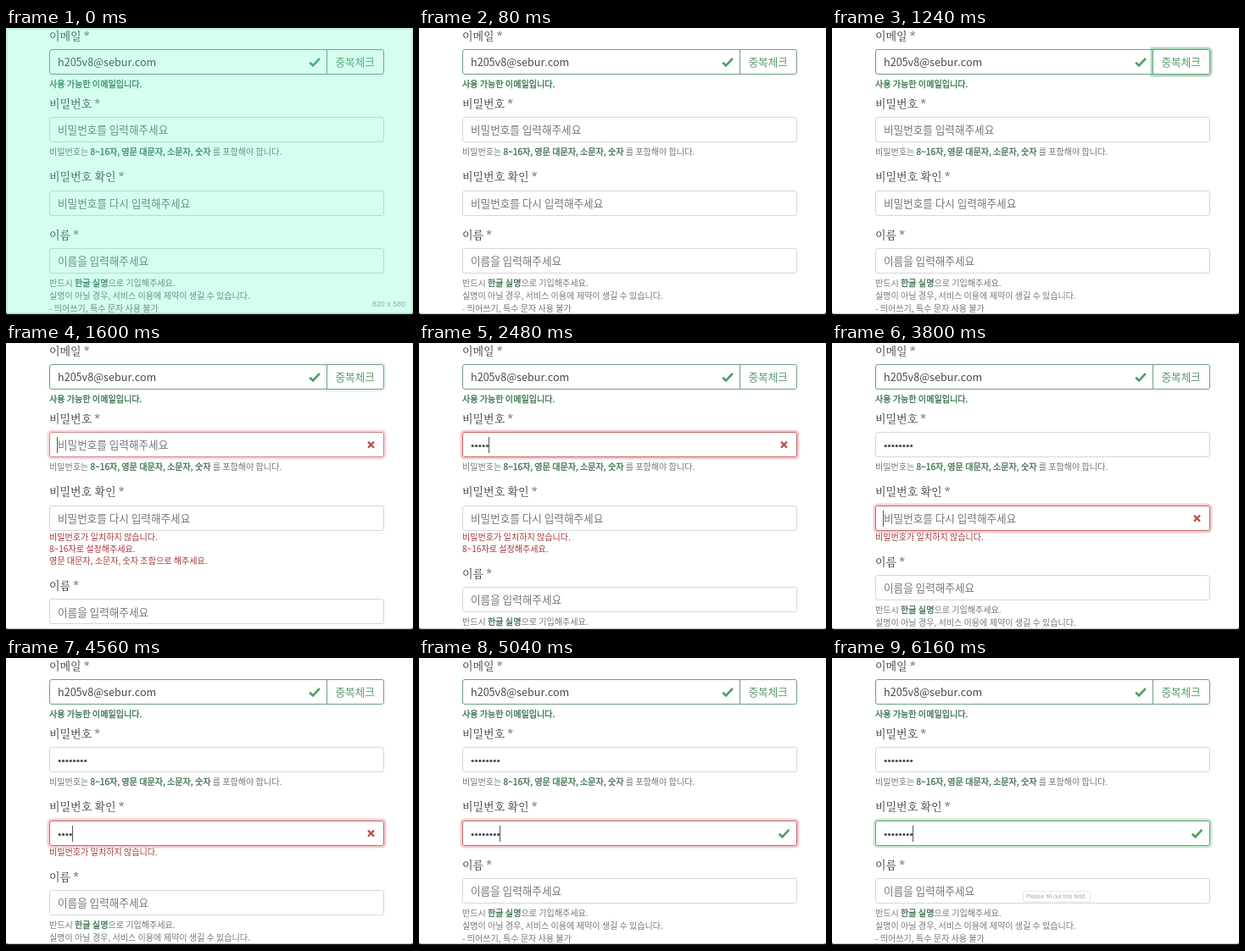
An HTML page with a canvas that plays this animation: 480x339 px, repeating every 6200 ms.

```html
<!DOCTYPE html>
<html lang="ko">
<head>
<meta charset="utf-8">
<title>회원가입 양식</title>
<style>
  html, body { margin: 0; width: 100%; height: 100%; overflow: hidden; background: #fff; }
  canvas { display: block; width: 480px; height: 339px; }
</style>
</head>
<body>
<canvas id="stage" width="480" height="339" lang="ko"></canvas>
<script>
const ctx = document.getElementById('stage').getContext('2d');
const LOOP = 6200, STEP = 40, FADE = 150;
const SANS = '"Noto Sans CJK KR", "Noto Sans KR", "Noto Sans CJK", sans-serif';
const SERIF = '"Noto Serif CJK KR", "Noto Serif KR", "Noto Sans CJK KR", serif';
const LATIN = '"Liberation Sans", Arial, sans-serif';

const INK = '#333', VALUE = '#46494c', HINT = '#747779', STRONG = '#3f7150';
const OK = '#34734a', ERROR = '#a0383a', GREEN_LINE = '#6f9f80';
const GRAY = [212, 215, 219], RED = [194, 104, 104], GREEN = [98, 160, 116];
const RED_GLOW = [220, 53, 69], GREEN_GLOW = [40, 167, 69];

const LEFT = 51.5, WIDTH = 394, HEIGHT = 29, INSET = 61, DOT_PITCH = 4.35;
const TOOLTIP = { show: 5480, hide: 6000 };

const password = {
  y: 105.5, hint: '비밀번호를 입력해주세요', focus: 1500, blur: 3480, valid: 2980,
  keys: [1880, 2040, 2160, 2360, 2480, 2640, 2800, 2960]
};
const confirmation = {
  y: 192.5, hint: '비밀번호를 다시 입력해주세요', focus: 3480, blur: Infinity, valid: 5020,
  keys: [3960, 4200, 4400, 4560, 4680, 4800, 4920, 5040], blink: [5440, 5880]
};
const errors = [
  { text: '비밀번호가 일치하지 않습니다.', until: 5040 },
  { text: '8~16자로 설정해주세요.', until: 2960 },
  { text: '영문 대문자, 소문자, 숫자 조합으로 해주세요.', until: 2480 }
];

const clamp = v => Math.min(1, Math.max(0, v));
const ease = v => { v = clamp(v); return v * v * (3 - 2 * v); };
const fadeFrom = (t, start) => ease((t - start) / FADE);
const mix = (a, b, k) => a.map((v, i) => Math.round(v + (b[i] - v) * k));
const rgba = (c, a = 1) => `rgba(${c.join(',')},${a})`;

// y is the optical middle of the line; returns the x after the text
function text(str, x, y, size, color, family = SANS) {
  ctx.font = `${size}px ${family}`;
  ctx.fillStyle = color;
  ctx.fillText(str, x, y + size * 0.37);
  return x + ctx.measureText(str).width;
}

const label = (str, y) => text(str, 51, y, 13, INK, SERIF);
const input = (str, y, color) => text(str, INSET, y, 12.6, color);
const note = (str, y, color = HINT, x = 51) => text(str, x, y, 10.08, color);

// medium weight: regular glyphs with a hairline outline
function strongNote(str, y, color, x = 51) {
  const end = note(str, y, color, x);
  ctx.strokeStyle = color;
  ctx.lineWidth = 0.3;
  ctx.strokeText(str, x, y + 10.08 * 0.37);
  return end;
}

function noteParts(before, strong, after, y) {
  let x = note(before, y);
  x = strongNote(strong, y, STRONG, x);
  note(after, y, HINT, x);
}

function box(x, y, w, h, radii, color, line = 1) {
  ctx.beginPath();
  ctx.roundRect(x, y, w, h, radii);
  ctx.strokeStyle = color;
  ctx.lineWidth = line;
  ctx.stroke();
}

function ring(x, y, w, h, radii, color) {
  box(x - 1.75, y - 1.75, w + 3.5, h + 3.5, radii, color, 2.5);
}

function polyline(points, color, width) {
  ctx.beginPath();
  points.forEach(([x, y]) => ctx.lineTo(x, y));
  ctx.strokeStyle = color;
  ctx.lineWidth = width;
  ctx.stroke();
}

function check(x, y) {
  polyline([[x - 5.8, y + 0.6], [x - 2, y + 4.2], [x + 5.9, y - 4.2]], '#549c66', 2.6);
}

function cross(x, y) {
  for (const s of [-1, 1])
    polyline([[x - 3.5, y - 3.5 * s], [x + 3.5, y + 3.5 * s]], '#b4504e', 2.2);
}

function emailField(t) {
  label('이메일 *', 9.5);
  const glow = fadeFrom(t, 800) - fadeFrom(t, 1500);
  if (glow > 0) ring(378.5, 25.5, 67, HEIGHT, [0, 4, 4, 0], rgba(GREEN_GLOW, 0.4 * glow));
  box(LEFT, 25.5, 327, HEIGHT, [2.5, 0, 0, 2.5], GREEN_LINE);
  box(378.5, 25.5, 67, HEIGHT, [0, 2.5, 2.5, 0], GREEN_LINE);
  input('h205v8@sebur.com', 40.5, VALUE);
  check(364, 40.2);
  text('중복체크', 388.5, 40.5, 12.6, '#5a9a6c');
  strongNote('사용 가능한 이메일입니다.', 66.5, OK);
}

function secretField(f, t) {
  const mid = f.y + 15;
  const glow = fadeFrom(t, f.focus) - fadeFrom(t, f.blur);
  const valid = fadeFrom(t, f.valid);
  if (glow > 0)
    ring(LEFT, f.y, WIDTH, HEIGHT, 4, rgba(mix(RED_GLOW, GREEN_GLOW, valid), 0.25 * glow));
  box(LEFT, f.y, WIDTH, HEIGHT, 2.5, rgba(mix(GRAY, mix(RED, GREEN, valid), glow)));

  const typed = f.keys.filter(k => t >= k).length;
  if (!typed) input(f.hint, mid, HINT);
  ctx.fillStyle = VALUE;
  for (let i = 0; i < typed; i++) {
    ctx.beginPath();
    ctx.arc(INSET + DOT_PITCH * (i + 0.5), mid + 1, 1.6, 0, Math.PI * 2);
    ctx.fill();
  }

  if (t < f.focus || t >= f.blur) return;
  (t >= f.valid ? check : cross)(430.5, mid - 0.4);
  const hidden = f.blink && t >= f.blink[0] && t < f.blink[1];
  if (!hidden) {
    ctx.fillStyle = '#555';
    ctx.fillRect(Math.round(INSET + DOT_PITCH * typed - 0.6), mid - 9.5, 1, 19);
  }
}

function nameField(shift) {
  label('이름 *', 244 + shift);
  box(LEFT, Math.round(260 + shift) + 0.5, WIDTH, HEIGHT, 2.5, rgba(GRAY));
  input('이름을 입력해주세요', 275.5 + shift, HINT);
  noteParts('반드시 ', '한글 실명', '으로 기입해주세요.', 301.1 + shift);
  note('실명이 아닐 경우, 서비스 이용에 제약이 생길 수 있습니다.', 316.2 + shift);
  note('- 띄어쓰기, 특수 문자 사용 불가', 331.3 + shift);
}

function tooltip(t) {
  if (t < TOOLTIP.show) return;
  ctx.globalAlpha = 1 - 0.5 * clamp((t - TOOLTIP.hide) / 160);
  ctx.fillStyle = '#fff';
  ctx.fillRect(225, 275, 80, 13);
  box(225.5, 275.5, 79, 12.5, 1.5, '#d2d2d2');
  text('Please fill out this field.', 229, 281.8, 7, '#505050', LATIN);
  ctx.globalAlpha = 1;
}

function captureTint(t) {
  const k = t < 40 ? 1 : t < 80 ? 0.45 : 0;
  if (!k) return;
  ctx.fillStyle = `rgba(60,246,185,${0.21 * k})`;
  ctx.fillRect(0, 0, 480, 338);
  box(1, 1, 478, 336, 0, `rgba(120,205,175,${0.25 * k})`, 2);
  ctx.globalAlpha = k;
  text('820 x 580', 432, 325.8, 8.9, '#8fb0a5', LATIN);
  ctx.globalAlpha = 1;
}

function draw(t) {
  ctx.fillStyle = '#111';
  ctx.fillRect(0, 0, 480, 339);
  ctx.save();
  ctx.beginPath();
  ctx.roundRect(0, 0, 480, 337.8, [0, 0, 2, 2]);
  ctx.clip();
  ctx.fillStyle = '#fff';
  ctx.fillRect(0, 0, 480, 339);

  emailField(t);
  label('비밀번호 *', 89);
  secretField(password, t);
  noteParts('비밀번호는 ', '8~16자, 영문 대문자, 소문자, 숫자', ' 를 포함해야 합니다.', 146.3);
  label('비밀번호 확인 *', 175.5);
  secretField(confirmation, t);

  const shown = t < 1520 ? [] : errors.filter(e => t < e.until);
  shown.forEach((e, i) => note(e.text, 229 + 14.15 * i, ERROR));
  nameField(14.15 * shown.length);
  tooltip(t);
  captureTint(t);
  ctx.restore();
}

const start = performance.now();
function tick() {
  const t = (performance.now() - start) % LOOP;
  draw(Math.floor(t / STEP) * STEP);
  requestAnimationFrame(tick);
}
tick();
</script>
</body>
</html>
```
